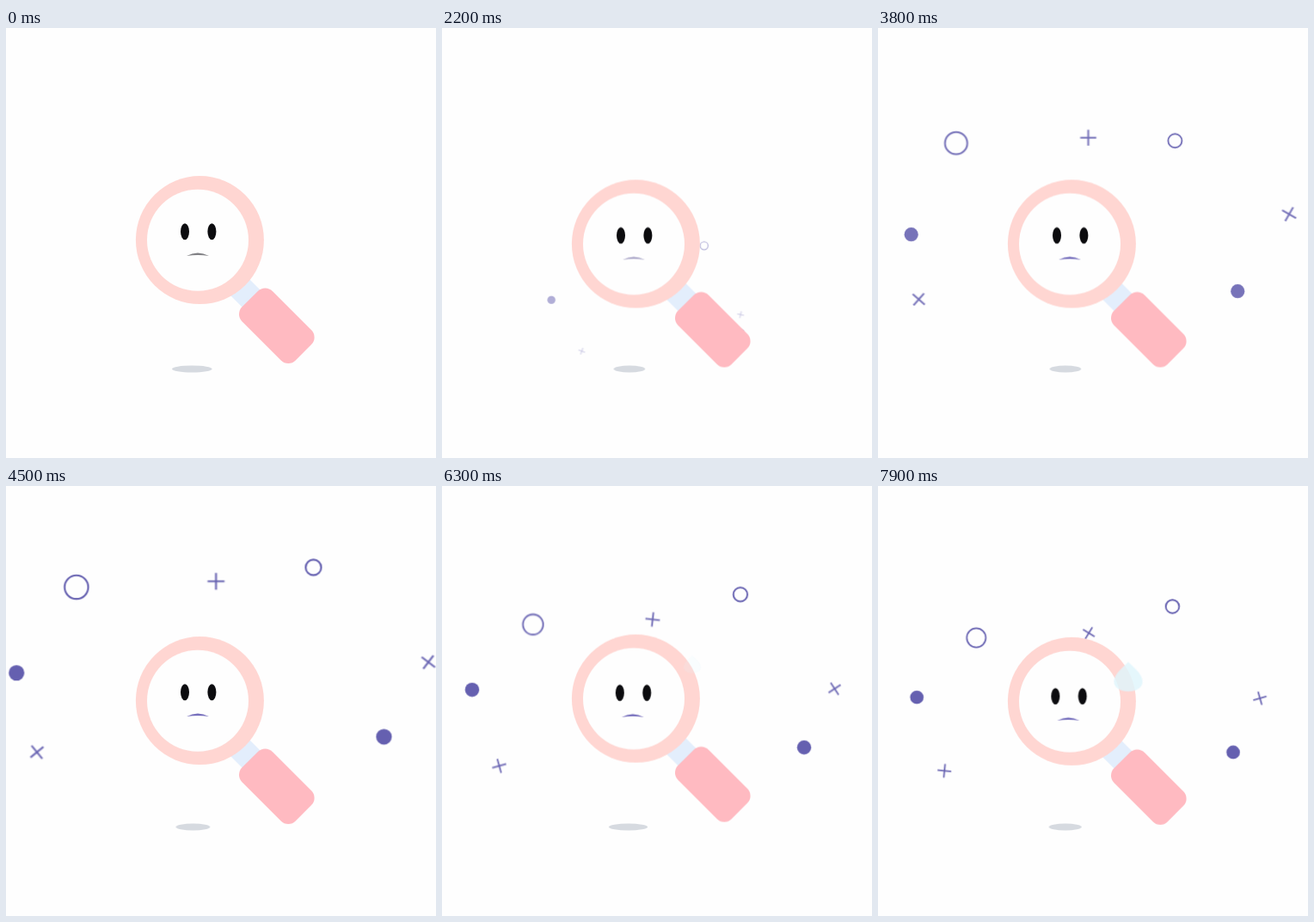
Recreate the animation shown at these times as an HTML page without scripts. Size 500x500 px, loop 8000 ms.

```html
<!DOCTYPE html>
<html lang="en">
<head>
<meta charset="utf-8">
<title>Nothing found</title>
<style>
  html, body { margin: 0; width: 100%; height: 100%; overflow: hidden; background: #fefefe; }
  svg { display: block; width: 100vw; height: 100vh; }

  .move { animation: 8s linear infinite; }

  /* Particles fly out of one point and then breathe */
  .burst { transform-origin: 249px 421px; fill: none; stroke: #6560b0; stroke-width: 2.2; }
  .dot { fill: #6560b0; stroke: none; }
  .early { animation-name: early; }
  .late { animation-name: late; }
  @keyframes early {
    0% { transform: scale(0); opacity: 0; }
    54% { transform: scale(1); opacity: 1; }
    93.73% { transform: scale(.8313); }
    100% { transform: scale(.8578); opacity: 1; }
  }
  @keyframes late {
    0%, 12.5% { transform: scale(0); opacity: 0; }
    50.79% { transform: scale(1); opacity: 1; }
    92.76% { transform: scale(.742); }
    100% { transform: scale(.7865); opacity: 1; }
  }

  .spin-l { animation-name: spin-l; }
  .spin-r { animation-name: spin-r; }
  .spin-t { animation-name: spin-t; }
  @keyframes spin-l { from { transform: rotate(-9deg); } to { transform: rotate(97deg); } }
  @keyframes spin-r { from { transform: rotate(-11deg); } to { transform: rotate(75deg); } }
  @keyframes spin-t { 0%, 73.5% { transform: rotate(0deg); } 100% { transform: rotate(33deg); } }

  .bob { animation-name: bob; }
  @keyframes bob {
    0%, 75% { transform: translateY(0); }
    37.5% { transform: translateY(6.1px); }
    100% { transform: translateY(4.07px); }
  }

  .shadow { transform-origin: 216.3px 396.5px; animation-name: shadow; }
  @keyframes shadow {
    0%, 75% { transform: translateX(0) scaleX(1); }
    37.5% { transform: translateX(2.2px) scaleX(.71); }
    100% { transform: translateX(1.47px) scaleX(.807); }
  }

  .face { animation-name: face; }
  @keyframes face {
    0%, 58.75% { transform: translate(0, 0); }
    78.75% { transform: translate(-1.2px, 3.1px); }
    100% { transform: translate(-1.7px, 3.9px); }
  }

  .eyes { transform-origin: 224px 237px; animation-name: blink; }
  @keyframes blink {
    0%, 62.5% { transform: scaleY(1); }
    65% { transform: scaleY(.5); }
    67.5% { transform: scaleY(.1); }
    72.5%, 100% { transform: scaleY(1); }
  }

  .mouth { animation-name: mouth; }
  @keyframes mouth {
    0% { fill: #808084; }
    27.5% { fill: #aeaaca; }
    37.5% { fill: #6f69ac; }
    47.5%, 100% { fill: #736cbb; }
  }

  .drop { transform-origin: 291px 219px; animation-name: drop; }
  @keyframes drop {
    0%, 73.75% { transform: translateY(-15px) scale(.5); opacity: 0; }
    100% { transform: translateY(0) scale(1); opacity: .86; }
  }
</style>
</head>
<body>
<svg viewBox="0 0 500 500">
  <defs>
    <path id="cross" d="M-10.2 0H10.2M0-10.2V10.2"/>
  </defs>

  <ellipse class="move shadow" cx="216.3" cy="396.5" rx="23.3" ry="4" fill="#d6dae0"/>

  <g class="move burst early">
    <circle class="dot" cx="9.9" cy="215.3" r="9.2"/>
    <circle class="dot" cx="441.3" cy="290.3" r="9.2"/>
    <circle cx="358.5" cy="91.5" r="9.1"/>
  </g>

  <g class="move burst late">
    <circle cx="76" cy="107" r="14.2"/>
    <g transform="translate(244 100)"><use class="move spin-t" href="#cross"/></g>
    <g transform="translate(28.5 305.6)"><use class="move spin-l" href="#cross"/></g>
    <g transform="translate(499.5 197.3)"><use class="move spin-r" href="#cross"/></g>
  </g>

  <g class="move bob">
    <path d="M262 291.5L290 319.5" stroke="#e3eefc" stroke-width="29"/>
    <rect x="-44" y="-25" width="88" height="50" rx="12" fill="#ffbac1" transform="translate(314.8 346.2) rotate(45)"/>
    <circle cx="225.4" cy="246.6" r="74.5" fill="#ffd6d2"/>
    <circle cx="223" cy="246.7" r="59" fill="#fefefe"/>

    <g class="move face">
      <g class="move eyes" fill="#0c0c0f">
        <ellipse cx="208" cy="236.7" rx="5" ry="9.5"/>
        <ellipse cx="239.4" cy="236.7" rx="5" ry="9.5"/>
      </g>
      <path class="move mouth" d="M210 265Q223 257.8 236 265Q223 262.8 210 265Z"/>
    </g>

    <path class="move drop" fill="#dff5fc" d="M291 201C297 207 308 215 308 224.5C308 232 300 236 291 236C282 236 274 232 274 224.5C274 215 285 207 291 201Z"/>
  </g>
</svg>
</body>
</html>
```
